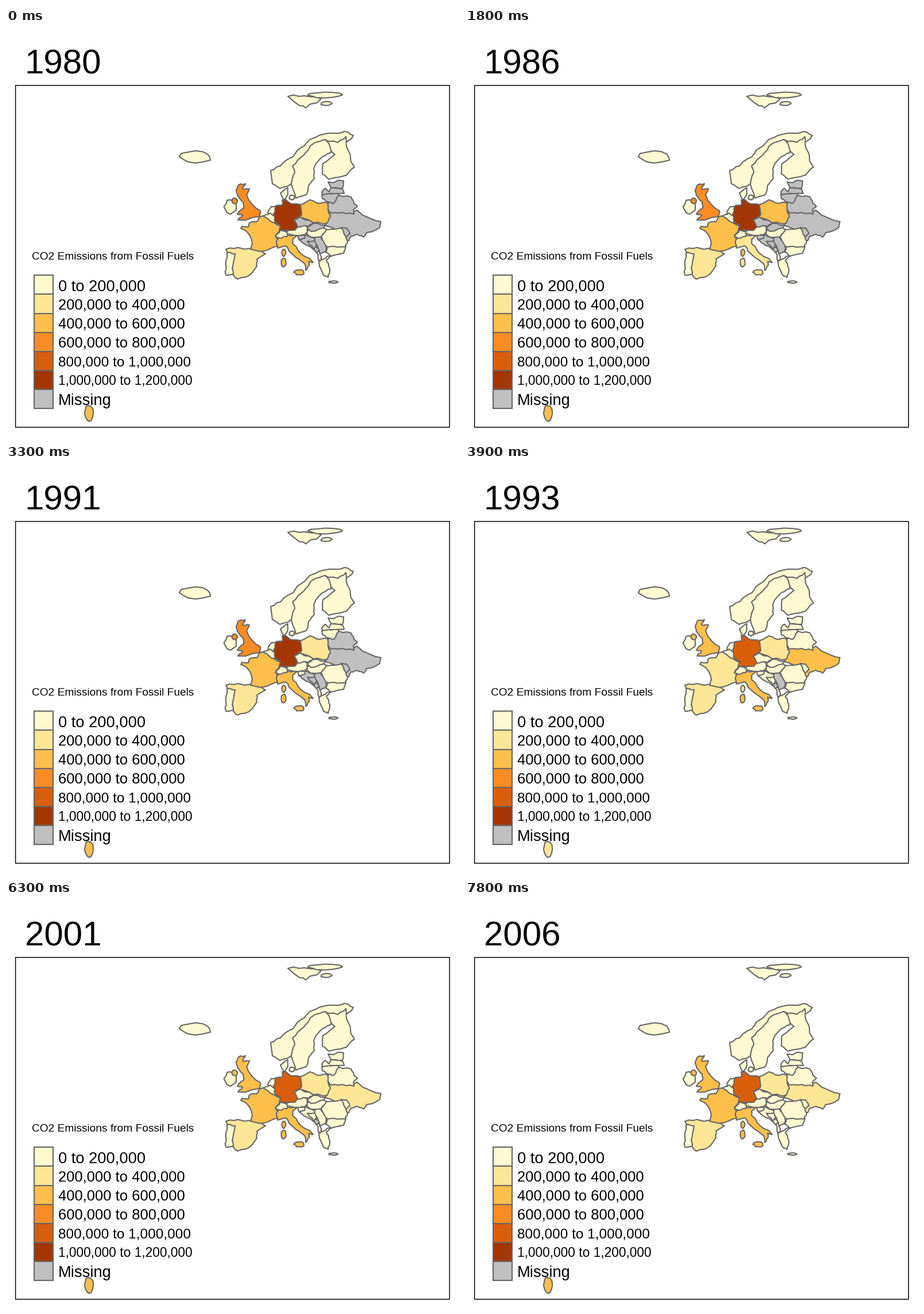
Recreate the animation shown at these times as a matplotlib script. Size 789x710 px, loop 8 s.

```python
import matplotlib.pyplot as plt
import numpy as np
from matplotlib.animation import FuncAnimation
from matplotlib.patches import Polygon, Rectangle

W, H, DPI = 789, 710, 64
PT = 72 / DPI  # points per pixel
FIRST_YEAR, FRAMES, STEP = 1980, 80, 100
FRAMES_PER_YEAR = 3
PALETTE = ["#FFFAD1", "#FEE697", "#FEBF4B", "#F98D23", "#DA5D0A", "#A33603", "#BFBFBF"]
MISSING = len(PALETTE) - 1
EDGE = "#666666"

# {first year: class}; countries not listed stay in class 0
CLASSES = {
    "germany": {1980: 5, 1992: 4},
    "britain": {1980: 3, 1981: 2, 1986: 3, 1993: 2},
    "france": {1980: 2, 1993: 1, 1996: 2},
    "italy": {1980: 2, 1981: 1, 1987: 2},
    "poland": {1980: 2, 1990: 1},
    "spain": {1980: 1},
    "romania": {1980: 0, 1987: 1, 1990: 0},
    "ukraine": {1980: MISSING, 1992: 2, 1996: 1},
}
FIRST_DATA = {
    1990: "estonia latvia lithuania czechia slovakia slovenia",
    1992: "belarus moldova croatia bosnia",
    2000: "serbia",
    2006: "montenegro",
}
for start, names in FIRST_DATA.items():
    for name in names.split():
        CLASSES[name] = {FIRST_YEAR: MISSING, start: 0}

rng = np.random.default_rng(4)
fig = plt.figure(figsize=(W / DPI, H / DPI), dpi=DPI, facecolor="white")
ax = fig.add_axes([0, 0, 1, 1])
ax.set(xlim=(0, W), ylim=(H, 0))
ax.axis("off")
shapes = []


def roughen(corners, amount=0.08):
    """Break every side into three slightly jagged pieces."""
    side = np.roll(corners, -1, axis=0) - corners
    normal = side[:, ::-1] * [1, -1]
    bend = rng.uniform(-amount, amount, (2, len(corners), 1))
    pieces = [corners, corners + side / 3 + normal * bend[0],
              corners + side * 2 / 3 + normal * bend[1]]
    return np.stack(pieces, axis=1).reshape(-1, 2)


def add_shape(country, outline):
    patch = Polygon(outline, closed=True, ec=EDGE, lw=2.1 * PT, joinstyle="round")
    shapes.append((country, ax.add_patch(patch)))


def land(country, *coords):
    add_shape(country, roughen(np.reshape(coords, (-1, 2)).astype(float)))


def island(country, x, y, rx, ry):
    angle = np.arange(0, 2 * np.pi, np.pi / 6)
    radius = rng.uniform(0.8, 1.1, angle.size)
    add_shape(country, np.column_stack([x + rx * radius * np.cos(angle),
                                        y + ry * radius * np.sin(angle)]))


def label(x, y, text, size):
    return ax.text(x, y, text, fontsize=size * PT, family="Liberation Sans",
                   color="black", va="baseline", ha="left")


def class_in(country, year):
    steps = CLASSES.get(country, {FIRST_YEAR: 0})
    return steps[max(start for start in steps if start <= year)]


# Later lands cover earlier ones, so each shared border is given only once.
# North
land("norway", 491, 119, 520, 118, 549, 123, 522, 139, 507, 132)
island("norway", 556, 116.5, 28, 5)
island("norway", 558, 131.5, 10, 3.5)
island("iceland", 330, 224, 28, 11)
land("norway", 461, 248, 478, 240, 500, 224, 529, 194, 545, 187, 572, 183, 590, 180,
     605, 187, 601, 193, 575, 205, 550, 208, 515, 240, 497, 271, 477, 279, 464, 271)
land("finland", 555, 194, 578, 199, 592, 189, 594, 209, 607, 242, 593, 256, 562, 263,
     551, 254, 552, 236, 573, 220, 560, 208)
land("sweden", 555, 194, 563, 202, 566, 217, 551, 224, 536, 245, 537, 262, 527, 274,
     523, 290, 505, 296, 497, 272, 503, 251, 499, 240, 514, 225, 526, 213, 530, 205)
land("denmark", 478, 287, 491, 278, 491, 288, 485, 299)
island("denmark", 498, 295, 5, 4)

# West
island("ireland", 391, 311, 11, 12)
island("britain", 398, 301, 5, 5)
land("britain", 405, 273, 417, 271, 412, 280, 424, 280, 419, 290, 436, 314, 443, 318,
     442, 328, 404, 334, 412, 326, 403, 324, 414, 313, 413, 303, 403, 291, 401, 282)
land("spain", 383, 385, 404, 382, 440, 386, 452, 393, 437, 402, 437, 414, 423, 431,
     403, 437, 394, 428, 390, 400)
land("portugal", 385, 391, 399, 393, 394, 419, 396, 428, 383, 430, 383, 413)
land("france", 443, 328, 448, 327, 469, 340, 480, 346, 470, 360, 474, 370, 476, 379,
     450, 388, 426, 385, 429, 375, 420, 355, 409, 349, 411, 345, 422, 346, 424, 339, 437, 337)
island("france", 484, 391, 3.5, 6)
island("france", 144, 670.5, 8, 14)

# South
land("italy", 471, 371, 476, 364, 508, 360, 499, 368, 500, 376, 513, 392, 535, 408,
     527, 406, 528, 413, 522, 422, 520, 410, 497, 392, 487, 379, 473, 383)
island("italy", 483.5, 408, 4.5, 8)
island("italy", 511, 425, 9, 5)
land("greece", 545, 406, 560, 397, 568, 396, 558, 404, 562, 411, 564, 422, 561, 434, 553, 430)
island("greece", 570, 442, 8, 2)
land("albania", 541, 390, 546, 388, 549, 403, 545, 406)
land("croatia", 511, 369, 523, 360, 539, 367, 536, 386, 517, 374)
land("bosnia", 525, 371, 538, 370, 541, 378, 536, 385)
land("slovenia", 508, 361, 521, 360, 520, 366, 510, 368)

# East
land("ukraine", 570, 315, 605, 320, 611, 317, 627, 328, 653, 337, 651, 347, 628, 356,
     623, 364, 611, 359, 601, 362, 597, 370, 590, 369, 575, 352, 557, 344, 555, 330)
land("belarus", 565, 322, 586, 321, 606, 324, 605, 317, 612, 310, 606, 305, 601, 294,
     580, 291, 565, 298, 558, 310)
land("lithuania", 550, 290, 575, 285, 580, 291, 571, 305, 562, 303, 551, 297)
land("latvia", 550, 286, 556, 279, 563, 285, 566, 278, 586, 280, 589, 288, 565, 288, 551, 290)
land("estonia", 561, 268, 588, 266, 586, 279, 566, 278)
land("moldova", 584, 347, 593, 348, 599, 358, 592, 364, 585, 355)
land("bulgaria", 560, 378, 592, 379, 588, 392, 566, 397, 557, 390)
land("serbia", 538, 363, 547, 362, 558, 376, 558, 385, 555, 390, 547, 393, 539, 374)
land("montenegro", 536, 384, 541, 381, 546, 387, 541, 391)
land("hungary", 525, 352, 553, 347, 560, 352, 549, 363, 531, 364, 524, 358)
land("romania", 558, 351, 584, 348, 592, 363, 595, 371, 591, 381, 571, 380, 558, 380, 549, 363)

# Centre
land("slovakia", 525, 347, 535, 340, 557, 343, 553, 348, 531, 354)
land("poland", 514, 307, 529, 299, 540, 304, 560, 304, 562, 321, 565, 328, 559, 340,
     535, 339, 508, 328)
land("netherlands", 456, 322, 462, 311, 472, 309, 466, 331)
land("belgium", 448, 327, 460, 322, 468, 328, 469, 340)
land("switzerland", 469, 363, 478, 352, 491, 354, 489, 363, 476, 366)
land("austria", 488, 355, 505, 346, 519, 343, 525, 347, 525, 355, 520, 360, 508, 361, 491, 358)
land("czechia", 500, 334, 513, 329, 535, 339, 527, 345, 504, 346)
land("germany", 481, 299, 488, 299, 497, 306, 512, 307, 515, 325, 502, 334, 508, 346,
     503, 352, 476, 352, 478, 344, 469, 338, 466, 324, 471, 309, 482, 307)

# Map frame, legend and title
ax.add_patch(Rectangle((16.6, 100), 755.9, 594.7, fill=False, ec="black",
                       lw=1.5 * PT, snap=False))
label(45.3, 403, "CO2 Emissions from Fossil Fuels", 19.1)
legend = [f"{low:,} to {low + 200000:,}" for low in range(0, 1200000, 200000)] + ["Missing"]
for row, text in enumerate(legend):
    top = 430.3 + 33.1 * row
    size = 27.3 - 0.046 * max(len(text) - 12, 0) ** 2  # long labels shrink
    ax.add_patch(Rectangle((49, top), 33.2, 33.1, fc=PALETTE[row], ec=EDGE, lw=2.1 * PT))
    label(90.6, top + 17.5 + 0.345 * size, text, size)
title = label(32.8, 80, "", 60)


def update(frame):
    year = FIRST_YEAR + frame // FRAMES_PER_YEAR
    title.set_text(str(year))
    for country, patch in shapes:
        patch.set_facecolor(PALETTE[class_in(country, year)])
    return [title] + [patch for _, patch in shapes]


anim = FuncAnimation(fig, update, frames=FRAMES, interval=STEP, repeat=True,
                     repeat_delay=0, blit=False)
plt.show()
```
